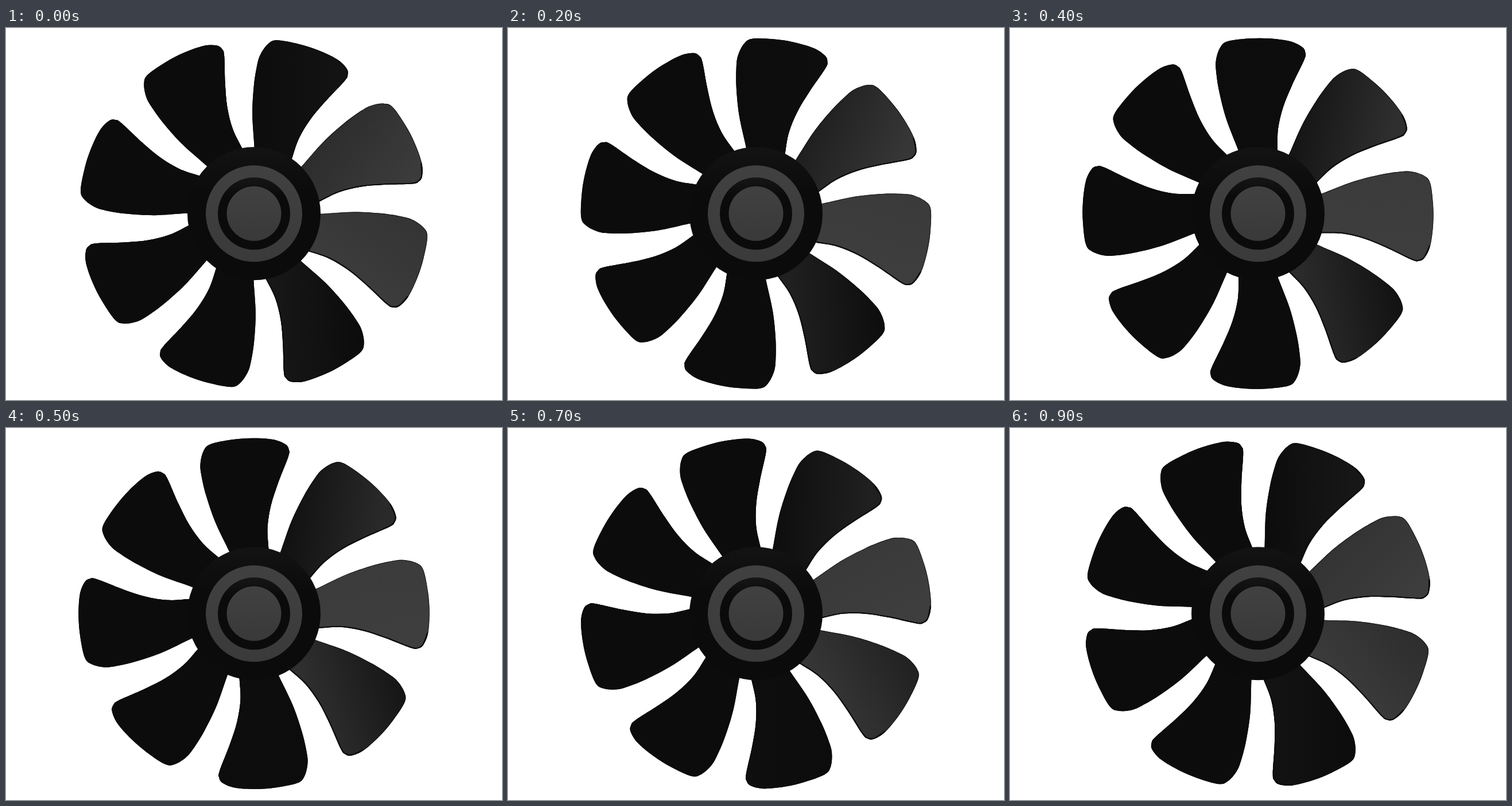
An HTML page with a canvas for the animation above (1000 ms loop, 864 by 648 pixels).

```html
<!DOCTYPE html>
<html lang="en">
<head>
<meta charset="utf-8">
<title>Fan</title>
<style>
html, body { margin: 0; width: 100%; height: 100%; overflow: hidden; background: #fff; }
canvas { display: block; }
</style>
</head>
<body>
<canvas id="stage" width="864" height="648"></canvas>
<script>
const ctx = document.getElementById('stage').getContext('2d');
const CX = 432, CY = 323.3, BLADES = 8, STEP = 4.4, STEP_MS = 100, LOOP_MS = 1000;
const rad = Math.PI / 180;
const gray = v => `rgb(${v},${v},${v})`;

// Upright blade around the hub centre, clockwise side first.
const sideEdge = [[34, -85], [34, -112], [35, -148], [44, -186], [59.5, -224], [80.5, -268], [82.5, -280]];
const tipEdge = [[77, -290], [56, -300], [20, -305], [-15, -305], [-53, -300], [-66, -289], [-73, -268],
  [-73, -248], [-67.5, -212], [-55, -164], [-35, -112], [-26, -85]];

// Catmull-Rom spline through the points.
function spline(pts) {
  const path = new Path2D();
  const at = i => pts[Math.max(0, Math.min(pts.length - 1, i))];
  path.moveTo(...pts[0]);
  for (let i = 0; i < pts.length - 1; i++) {
    const [a, b, c, d] = [at(i - 1), at(i), at(i + 1), at(i + 2)];
    path.bezierCurveTo(
      b[0] + (c[0] - a[0]) / 6, b[1] + (c[1] - a[1]) / 6,
      c[0] - (d[0] - b[0]) / 6, c[1] - (d[1] - b[1]) / 6, c[0], c[1]);
  }
  return path;
}

const blade = spline([...sideEdge, ...tipEdge]);
blade.closePath();
const rim = spline([...sideEdge, ...tipEdge.slice(0, 2)]);

// Light falls from the right; dir is the blade direction in degrees above it.
const glow = (dir, peak, width, power) =>
  12 + peak * Math.exp(-Math.pow(Math.abs(dir - 1.5) / width, power));

function drawBlade(dir) {
  const dark = glow(dir, 47, 37, 2.8), light = glow(dir, 50, 58, 3.5);
  const tilt = -33 * rad * Math.sin(2 * dir * rad);
  const gx = 80 * Math.cos(tilt), gy = 80 * Math.sin(tilt);
  const shade = ctx.createLinearGradient(-gx, -225 - gy, gx, -225 + gy);
  shade.addColorStop(0, gray(dark));
  shade.addColorStop(1, gray(light));

  ctx.save();
  ctx.translate(CX, CY);
  ctx.rotate((90 - dir) * rad);
  ctx.fillStyle = shade;
  ctx.fill(blade);
  ctx.clip(blade);
  ctx.strokeStyle = gray(12);
  ctx.lineWidth = 1.5;
  ctx.stroke(blade);
  ctx.lineWidth = 4;
  ctx.stroke(rim);
  ctx.restore();
}

function disc(r, top, bottom, mid) {
  const fill = ctx.createLinearGradient(0, CY - r, 0, CY + r);
  fill.addColorStop(0, gray(top));
  fill.addColorStop(mid, gray(bottom));
  ctx.fillStyle = fill;
  ctx.beginPath();
  ctx.arc(CX, CY, r, 0, 2 * Math.PI);
  ctx.fill();
}

function draw(t) {
  const step = Math.floor((t % LOOP_MS) / STEP_MS);
  ctx.fillStyle = '#fff';
  ctx.fillRect(0, 0, 864, 648);
  for (let i = 0; i < BLADES; i++) {
    const dir = (step - 4) * STEP + i * 360 / BLADES;
    drawBlade(dir > 180 ? dir - 360 : dir);
  }
  disc(116, 19, 11, 0.35);
  disc(84, 65, 58, 1);
  disc(63, 22, 11, 0.25);
  disc(47.5, 65, 57, 1);
}

const start = performance.now();
function tick() {
  draw(performance.now() - start);
  requestAnimationFrame(tick);
}
tick();
</script>
</body>
</html>
```
